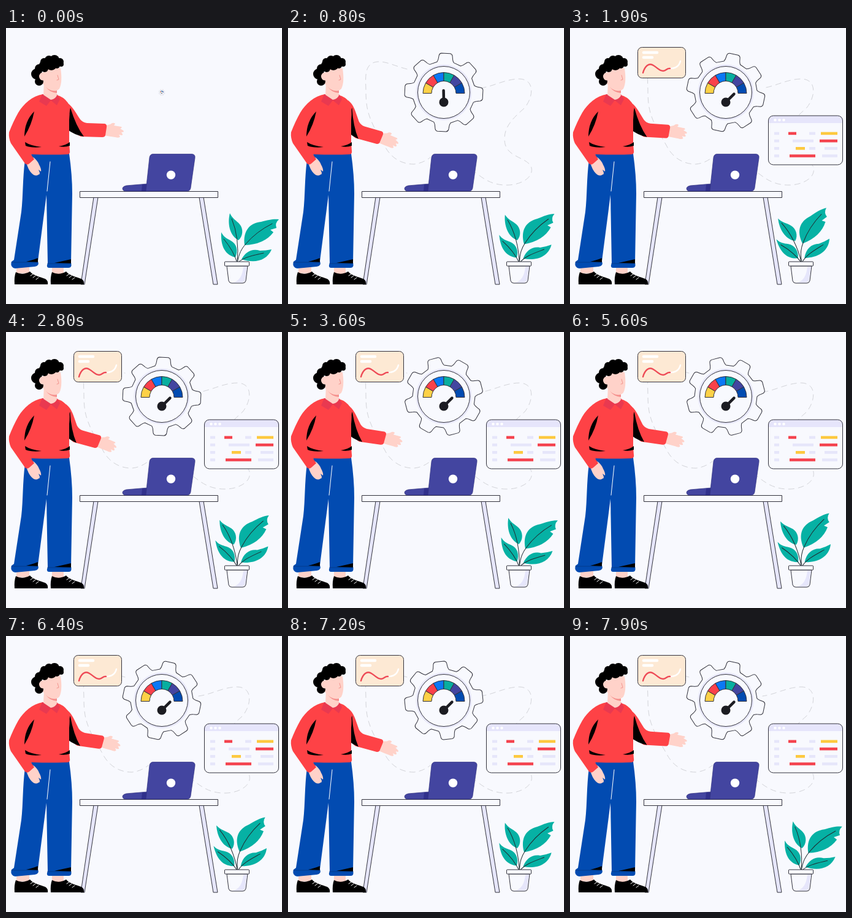
Animation of 450 by 450 pixels, one loop 8 s. Source, as an HTML page:

```html
<!DOCTYPE html>
<html lang="en">
<head>
<meta charset="utf-8">
<title>Performance monitoring</title>
<style>
html,body{margin:0;width:100%;height:100%;overflow:hidden;background:#f8f9fe}
svg{display:block;width:100%;height:100%}
.line{fill:none;stroke-linecap:round;stroke-linejoin:round}
.ink{stroke:#33333d;stroke-width:1;stroke-linejoin:round}
.paper{fill:#f8f9fe}
.skin{fill:#ffd2c9}
.red{fill:#fe4246}
</style>
</head>
<body>
<svg viewBox="0 0 450 450">
  <g id="trails" class="line" stroke="#d2d3d8" stroke-width="1" stroke-dasharray="9 7">
    <path d="M194 67C174 62 160 54 146 55C122 57 127 85 127 103C127 122 129 134 134 147C142 168 150 178 158 193C168 212 185 222 205 222C216 221 224 217 232 211"/>
    <path d="M314 98C336 95 354 83 378 83C402 84 401 111 386 130C367 147 353 160 353 181C353 211 386 209 396 225C403 242 382 255 360 256C335 257 321 248 305 235"/>
  </g>

  <g id="gear">
    <path id="cog" class="ink paper"/>
    <circle r="45.500" fill="#e8e8fb"/>
    <circle class="ink paper" r="42.500"/>
    <g id="dial" class="ink" transform="translate(0 1.500)"></g>
    <g id="needle" fill="#1c1c22">
      <circle r="7.500"/>
      <path class="line" d="M0 0V-19" stroke="#1c1c22" stroke-width="4.500"/>
    </g>
  </g>

  <g id="chart">
    <rect class="ink" x="110.500" y="31.500" width="78" height="50" rx="7" fill="#fde9d4"/>
    <path class="line" d="M120 40H142M120 48H134" stroke="#fff" stroke-width="4.500"/>
    <path class="line" d="M163 66C172 66 178 62 180 54" stroke="#fff" stroke-width="2.500"/>
    <path id="curve" class="line" d="M119 73C122 62 129 56 136 61C143 65 145 70 152 70C157 70 158 65 163 66" stroke="#ee4a56" stroke-width="2.400" pathLength="100"/>
  </g>

  <g id="panel">
    <rect class="paper" x="324" y="143" width="121" height="80" rx="8"/>
    <path d="M324 155V151Q324 143 332 143H437Q445 143 445 151V155Z" fill="#e6e5fb"/>
    <path class="line" d="M334.500 150h0M341.500 150h0M348.500 150h0" stroke="#fff" stroke-width="4.500"/>
    <g id="bars"></g>
    <rect class="ink" x="323.500" y="143" width="121" height="80" rx="8" fill="none"/>
  </g>

  <g id="plant">
    <g fill="#06b1a4">
      <path d="M389 354C386 331 397 318 416 316C428 313 435 311 445 312Q438 318 441 326L431 329L436 333Q421 353 389 354Z"/>
      <path d="M379 346C387 339 387 327 381 320C376 314 369 311 365 302C361 318 364 338 379 346Z"/>
      <path d="M374 374C379 363 376 352 367 347C360 343 355 341 351 333C350 351 354 369 374 374Z"/>
      <path d="M384 377C391 364 402 359 414 363Q424 363 433 361C425 380 405 384 384 377Z"/>
    </g>
    <path class="line" stroke="#202c32" stroke-width="1" d="M377 383C380 367 384 360 391 352Q408 332 434 319M368 311Q381 342 377 383M355 344Q371 363 377 383M377 383C389 373 402 371 420 367"/>
  </g>
  <path class="ink paper" d="M360 388H394L391 412Q390 416 386 416H368Q364 416 363 412Z"/>
  <path d="M387 389H393L390 411Q389 415 385 415H370Q385 412 387 389Z" fill="#e6e6fb"/>
  <rect class="ink paper" x="356.500" y="381" width="40" height="7" rx="1"/>

  <g class="ink">
    <path d="M143 276H150L128 418H122ZM315 276H322L345 418H338Z" fill="#e6e6fb"/>
    <rect class="paper" x="120.500" y="266.500" width="225" height="10"/>
  </g>
  <path d="M196 257L231 254V266H195Q190 266 190 261Q191 258 196 257Z" fill="#4345a0" stroke="#32327f" stroke-width=".7"/>
  <path d="M222 255H231V266H221Z" fill="#30308c"/>
  <path d="M234 211Q235 205.500 240 205.500H303Q309 206 308 212L301 261Q300 266 295 266H228Z" fill="#4345a0" stroke="#32327f" stroke-width=".7"/>
  <circle cx="269" cy="239.600" r="7.200" fill="#fff"/>

  <path class="skin" d="M17 389H38V400H17ZM75 389H94V402H75Z"/>
  <g id="shoe">
    <path d="M16 398Q27 404 39 397C45 404 56 406 64 409Q69 412 68 418H14Q13 406 16 398Z"/>
    <path class="line" stroke="#fff" stroke-width="1" d="M40 404L44 401M44 407L48 404M49 410L53 407"/>
  </g>
  <use href="#shoe" x="59" y="0"/>
  <path d="M43 205H103Q108 240 108 270L106 383Q108 391 102 391H70Q65 391 68 383L66 272L52 380Q55 388 47 389L15 392Q6 390 9 381L13 378L25 300C28 275 27 245 31 215Z" fill="#024bb1"/>
  <path d="M33 381Q45 378 52 375V382ZM79 383L106 377V384Z"/>
  <path class="line" d="M9 382H51M68 384H106" stroke="#053983" stroke-width=".8"/>
  <path class="line" d="M72 218L67 266" stroke="#fff" stroke-width="1"/>

  <g id="arm">
    <path class="skin" d="M159 160L170 157Q175 153 178 156L176 159L188 161Q190 163 186 164L191 167Q194 170 188 170L190 173Q191 176 184 174L186 177Q185 180 178 178Q170 177 159 175Z"/>
    <path class="red" d="M96 120C107 125 111 134 121 149Q125 154 132 155L161 156Q165 157 164 162L162 175Q161 178 157 178L122 177Q110 172 98 150Z"/>
    <path d="M105 130Q114 160 127 177Q112 175 98 164Z"/>
  </g>

  <path class="skin" d="M33 219L45 211Q52 217 54 223Q58 230 57 234L53 231Q57 239 53 239Q48 243 42 237Q36 231 33 219Z"/>
  <path class="red" d="M60 108C43 111 29 123 20 138Q12 152 5 170Q4 179 8 188L31 221Q34 224 38 221L46 214L31 191L33 203Q35 206 43 206Q75 207 101 206Q105 205 104 200L103 187V150Q105 130 101 122Q94 112 82 109Z"/>
  <path d="M46 136Q30 152 30 177Q42 158 46 136ZM31 186Q40 192 58 194Q42 196 32 192ZM104 186Q98 191 86 193Q96 195 104 192Z"/>
  <path d="M59 108L54 120L66 127L73 118L83 126L88 116L83 108Z" fill="#e93950"/>
  <path class="skin" d="M62 88L61 109L73 117Q80 116 83 110L82 96Z"/>
  <path d="M65 96Q73 103 83 102V106Q71 105 65 96Z" fill="#f58f8c"/>
  <path class="skin" d="M60 73Q73 60 89 66C91 79 91 91 87 99Q80 106 68 99L60 91Z"/>
  <g id="hair"></g>
  <ellipse class="skin" cx="60" cy="79" rx="6" ry="6.500"/>
  <path class="line" d="M84 77Q85 80 86 84L83 85" stroke="#f2948e" stroke-width="1"/>
</svg>
<script>
const $ = id => document.getElementById(id);
const LOOP = 8000, TAU = Math.PI * 2;
const polar = (r, a) => `${(r * Math.cos(a)).toFixed(2)} ${(r * Math.sin(a)).toFixed(2)}`;
const add = (id, tag, attrs) => {
  const el = document.createElementNS("http://www.w3.org/2000/svg", tag);
  for (const k in attrs) el.setAttribute(k, attrs[k]);
  $(id).append(el);
  return el;
};

// Eight rounded teeth
let cog = "";
for (let i = 0; i < 8; i++) {
  const a = i * TAU / 8, p = (r, d) => polar(r, a + d);
  cog += `${i ? "L" : "M"}${p(51, -.27)}Q${p(54, -.22)} ${p(56, -.21)}L${p(61, -.18)}` +
    `Q${p(64, -.16)} ${p(64, -.11)}L${p(64, .11)}Q${p(64, .16)} ${p(61, .18)}` +
    `L${p(56, .21)}Q${p(54, .22)} ${p(51, .27)}`;
}
$("cog").setAttribute("d", cog + "Z");

["#fdd147", "#f9414b", "#0b78f5", "#08ae9f", "#4345a0", "#024bb1"].forEach((fill, i) => {
  const a = Math.PI * (1 + i / 6), b = a + Math.PI / 6;
  add("dial", "path", {fill, d: `M${polar(34, a)}A34 34 0 0 1 ${polar(34, b)}L${polar(20, b)}A20 20 0 0 0 ${polar(20, a)}Z`});
});

const GREY = "#e6e6fa", RED = "#f4434e", GOLD = "#fdc93f";
const bars = [
  [[333, 8, GREY], [356, 13, RED], [390, 10, GREY], [409, 27, GOLD]],
  [[333, 8, GREY], [363, 34, GREY], [407, 29, RED]],
  [[333, 8, GREY], [368, 15, GOLD], [390, 10, GREY], [415, 21, GREY]],
  [[333, 8, GREY], [358, 42, RED], [411, 25, GREY]]
].flatMap((row, i) => row.map(([x, width, fill]) =>
  ({width, el: add("bars", "rect", {x, y: 169.6 + i * 12.2, width, height: 4.6, fill})})));

[[54, 87, 7], [50, 75, 9], [54, 66, 7], [62, 61, 8], [62, 55, 6], [70, 52, 7], [79, 52, 8],
 [88, 55, 6], [90, 59, 4], [74, 60, 9], [55, 79, 7], [83, 61, 5], [63, 66, 6]].forEach(([cx, cy, r]) =>
  add("hair", "circle", {cx, cy, r}));

const span = (t, a, b) => Math.min(1, Math.max(0, (t - a) / (b - a)));
const out = x => 1 - (1 - x) ** 3;
const smooth = x => x * x * (3 - 2 * x);
// Triangle wave from 1 down to -1 and back
const swing = (t, period) => Math.abs(t % period / period * 4 - 2) - 1;
const move = (id, value) => $(id).setAttribute("transform", value);
const zoom = (id, x, y, s) => move(id, `translate(${x} ${y}) scale(${s}) translate(${-x} ${-y})`);

function draw(now) {
  const t = Math.floor(now % LOOP / 100) * 100;
  move("arm", `rotate(${8.5 * (1 - swing(t, 2000))} 105 128)`);
  move("plant", `rotate(${-10.3 * (1 - swing(t, 4000))} 377 381)`);
  move("gear", `translate(254 105) scale(${.08 + .92 * out(span(t, 0, 700))})`);
  move("cog", `rotate(${21 + t * .09})`);
  move("needle", `translate(0 16) rotate(${-80 + 125 * smooth(span(t, 300, 1150))})`);
  $("trails").setAttribute("opacity", span(t, 100, 700));
  $("trails").setAttribute("stroke-dashoffset", -t * .02);
  zoom("chart", 149.5, 56.5, out(span(t, 900, 1500)));
  zoom("panel", 384, 183, out(span(t, 900, 1500)));
  $("curve").setAttribute("stroke-dasharray", `${100 * span(t, 1200, 1800)} 200`);
  bars.forEach(({width, el}, i) =>
    el.setAttribute("width", width * out(span(t, 1200 + i * 20, 1550 + i * 20))));
  requestAnimationFrame(show);
}
let start;
function show(now) {
  start ??= now;
  draw(now - start);
}
draw(0);
</script>
</body>
</html>
```
